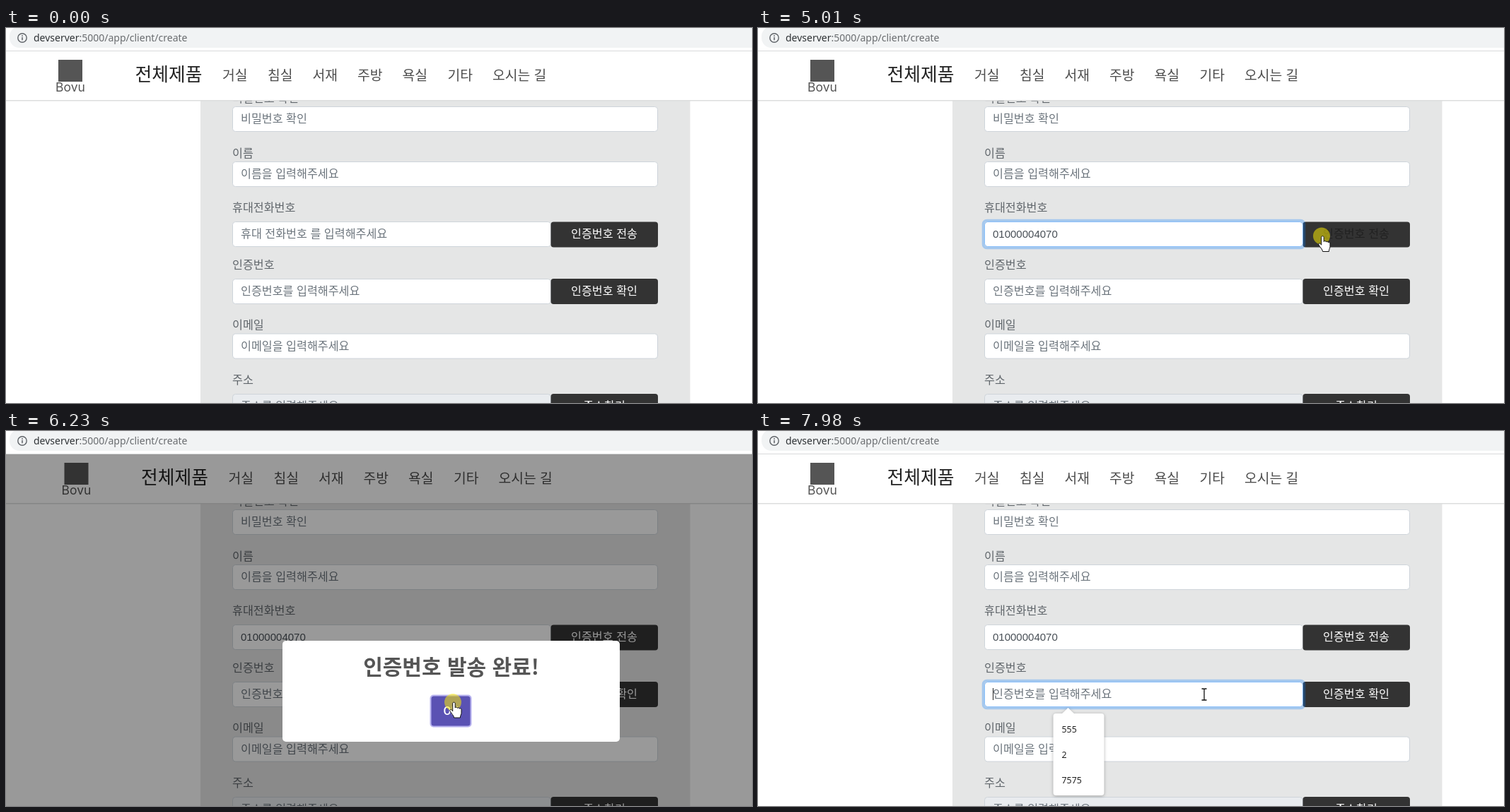
These frames come from a looping animation (1055x531 px, 8000 ms). An HTML page:

```html
<!DOCTYPE html>
<html lang="ko">
<head>
<meta charset="utf-8">
<title>회원가입</title>
<style>
html, body { margin: 0; width: 100%; height: 100%; overflow: hidden; background: #fff; }
svg { display: block; width: 100%; height: 100%; }
text { font: 16.2px "Noto Sans CJK KR", "Noto Sans CJK JP", sans-serif; white-space: pre; }
.label { fill: #60666b; }
.hint { fill: #6c757d; }
.button { fill: #fff; text-anchor: middle; }
.nav { font-size: 19.3px; fill: #4d4d4d; }
.brand { font-size: 25.8px; fill: #222; }
.logo { font: 17.5px Inter, sans-serif; fill: #555; text-anchor: middle; }
.url { font: 14px "Noto Sans", sans-serif; fill: #6a6d70; }
.typed { font: 15px "Liberation Sans", Arial, sans-serif; fill: #495057; }
.option { font: 12.4px "Noto Sans", sans-serif; fill: #222; }
.title { font-size: 30px; font-weight: 600; fill: #555; text-anchor: middle; }
.ok { font: 500 16px Roboto, sans-serif; fill: #fff; text-anchor: middle; }
.popup { filter: drop-shadow(0 1px 2px rgba(0, 0, 0, .3)); }
</style>
</head>
<body>
<svg id="stage" viewBox="0 0 1055 531"></svg>
<script>
const LOOP = 8000;
const PHONE = '01000004070';
const DIGIT = 8.34;

const text = (x, y, str, cls, id = '') => `<text x="${x}" y="${y}" class="${cls}" id="${id}">${str}</text>`;
const rect = (x, y, w, h, fill, extra = '') =>
  `<rect x="${x}" y="${y}" width="${w}" height="${h}" fill="${fill}" ${extra}/>`;

const field = (y, w, hint, id, fill = '#fff') =>
  rect(320.5, y + .5, w, 35, fill, 'rx="4" stroke="#ced4da"') + text(332, y + 23, hint, 'hint', id);
const button = (y, label, id) =>
  rect(770.5, y, 151.5, 36, '#333', 'rx="4"') + text(846, y + 22.5, label, 'button', id);
const ring = (id, x, y, w, h) => `<g id="${id}" fill="none">
  ${rect(x - 1.5, y - 1.5, w + 3, h + 3, 'none', 'rx="5" stroke="#007bff" stroke-opacity=".28" stroke-width="3.6"')}
  ${rect(x + .5, y + .5, w - 1, h - 1, 'none', 'rx="4" stroke="#80bdff" stroke-opacity=".85"')}</g>`;
const popup = (id, y, w, options) => `<g id="${id}" class="popup">
  <path d="M429 ${y + 1}l9.5-9 9.5 9z" fill="#fff"/>
  ${rect(417.5, y, w, options.length * 36 + 8, '#fff', 'rx="4"')}
  ${options.map((o, i) => text(429.5, y + 27 + i * 36, o, 'option')).join('')}</g>`;

const numbers = [PHONE, '01011112020', '01010103030'];
const menu = [[306, '거실'], [370, '침실'], [433.5, '서재'], [497, '주방'], [560.5, '욕실'], [624.5, '기타'], [688, '오시는 길']];

document.getElementById('stage').innerHTML = `
  ${rect(0, 0, 1055, 531, '#fff')}
  ${rect(275, 100, 692.5, 431, '#e5e6e6')}
  ${text(320, 105, '비밀번호 확인', 'label')}
  ${text(320, 183, '이름', 'label')}
  ${text(320, 260, '휴대전화번호', 'label')}
  ${text(320, 341, '인증번호', 'label')}
  ${text(320, 426, '이메일', 'label')}
  ${text(320, 504, '주소', 'label')}
  ${field(111, 601, '비밀번호 확인')}
  ${field(189, 601, '이름을 입력해주세요')}
  ${field(274, 450, '휴대 전화번호 를 입력해주세요', 'phoneHint')}
  ${field(355, 450, '인증번호를 입력해주세요')}
  ${field(432.5, 601, '이메일을 입력해주세요')}
  ${field(518, 450, '주소를 입력해주세요', '', '#e9ecef')}
  ${button(274.5, '인증번호 전송', 'sendLabel')}
  ${button(355, '인증번호 확인')}
  ${button(518, '주소찾기')}
  ${text(332, 297, '', 'typed', 'phone')}
  ${ring('phoneRing', 320, 274, 451, 36)}
  ${ring('codeRing', 320, 355, 451, 36)}
  ${ring('sendRing', 770, 274, 152, 36)}
  ${rect(0, 0, 1, 17, '#222', 'id="caret"')}
  ${popup('allNumbers', 319, 120, [...numbers, '1234', '777', '12'])}
  ${popup('someNumbers', 319, 120, numbers)}
  ${popup('oneNumber', 319, 120, [PHONE])}
  ${popup('codes', 400, 72, ['555', '2', '7575'])}
  ${rect(0, 102, 1055, 1.5, '#dcdddd')}
  ${rect(0, 33, 1055, 69, '#fff')}
  <g id="header">
    ${rect(74, 45, 34, 31, '#555')}
    ${text(91, 90, 'Bovu', 'logo')}
    ${text(182.5, 75, '전체제품', 'brand')}
    ${menu.map(([x, s]) => text(x, 74, s, 'nav')).join('')}
  </g>
  ${rect(0, 33, 1055, 498, '#000', 'id="shade"')}
  ${rect(0, 0, 1055, 33, '#fff')}
  ${rect(5, -2, 1080, 30, '#f1f3f4', 'rx="14"')}
  ${rect(0, 32, 1055, 1, '#d9dadb')}
  <circle cx="23" cy="14" r="6.2" fill="none" stroke="#5f6368" stroke-width="1.4"/>
  <path d="M23 13v4.2M23 10.3v1.6" stroke="#5f6368" stroke-width="1.5"/>
  ${text(39, 19, '<tspan fill="#2f3336">devserver</tspan>:5000/app/client/create', 'url')}
  <g id="modal">
    ${rect(-238.5, -71.5, 477, 143, '#fff', 'rx="5"')}
    ${text(0, -23.5, '인증번호 발송 완료!', 'title')}
    ${rect(-30, 5, 59, 46, '#b7b2ef', 'rx="5"')}
    ${rect(-28, 7, 55, 42, '#7066e0', 'rx="3.5" id="ok"')}
    ${text(-.5, 33.5, 'OK', 'ok')}
  </g>
  <g id="pointer">
    <circle id="click" r="12" fill="#fff000" fill-opacity=".52"/>
    <path id="arrow" d="M.5 .5v16l3.7-3.5 2.5 5.7 2.6-1.1-2.4-5.5h5z" fill="#fff" stroke="#111"/>
    <path id="hand" d="M-.3 2c0-2.5 3.5-2.5 3.5 0v6c.4-1.4 3.1-1.3 3.2.4.5-1.1 2.8-.8 2.9.8.7-.9 2.7-.5 2.7 1.2v4.800c0 2-1.600 3.500-1.600 6.800H1.600C1.300 18.500-2 16.500-4 12.500c-.8-1.900 1.300-2.900 2.600-1.300l1.100 1.500z" fill="#fff" stroke="#111"/>
    <g id="beam" fill="none">
      <path d="M-3.500-8h2.500q1 0 1 1 0-1 1-1h2.500M0-7V7M-3.500 8h2.500q1 0 1-1 0 1 1 1h2.500" stroke="#fff" stroke-width="3"/>
      <path d="M-3.500-8h2.500q1 0 1 1 0-1 1-1h2.500M0-7V7M-3.500 8h2.500q1 0 1-1 0 1 1 1h2.500" stroke="#111" stroke-width="1.300"/>
    </g>
  </g>`;

const ui = {};
document.querySelectorAll('[id]').forEach(el => { if (el.id) ui[el.id] = el; });

// Each track is a list of [time, value].
const typing = [[0, 0], [2100, 1], [2440, 2], [2510, 3], [2780, 4], [2980, 5], [3040, 6], [3170, 7],
  [3430, 8], [3640, 9], [3710, 10], [3780, 11]];
const blink = [[0, 0], [900, 1], [1300, 0], [1700, 1], [4110, 0], [4510, 1], [4910, 0], [7715, 1]];
const moveX = [[330, 992], [880, 638], [4430, 638], [4930, 797], [5270, 797], [6030, 632], [7100, 632], [7250, 631]];
const moveY = [[330, 525], [880, 287], [4430, 287], [4930, 294.5], [5270, 294.5], [6030, 384], [6630, 384],
  [6660, 382], [7100, 382], [7250, 373]];
const modalScale = [[5072, .7], [5210, 1.05], [5315, .95], [5375, 1], [6285, 1], [6435, .5]];

const smooth = p => p * p * (3 - 2 * p);
const easeOut = p => 1 - (1 - p) ** 2.3;
const linear = p => p;

function held(track, t) {
  return track.reduce((value, [at, next]) => t >= at ? next : value, track[0][1]);
}
function tween(track, t, ease = linear) {
  const i = track.findIndex(([at]) => at > t);
  if (i === 0) return track[0][1];
  if (i < 0) return track[track.length - 1][1];
  const [t0, a] = track[i - 1], [t1, b] = track[i];
  return a + (b - a) * ease((t - t0) / (t1 - t0));
}
const pulse = (t, in0, in1, out0, out1) => tween([[in0, 0], [in1, 1], [out0, 1], [out1, 0]], t);
const within = (t, a, b) => t >= a && t < b;
const show = (el, on) => { el.style.opacity = +on; };

function cursorKind(t, x, y) {
  if (within(t, 5075, 6640)) {
    return t < 6290 && Math.abs(x - 629) < 28 && within(y, 375, 418) ? 'hand' : 'arrow';
  }
  const rows = [[111, 147], [189, 225], [274, 310], [355, 391], [432, 468], [518, 554]];
  const row = rows.findIndex(([top, bottom]) => within(y, top, bottom));
  if (row < 0 || !within(x, 320, 922)) return 'arrow';
  return x > 770 && [2, 3, 5].includes(row) ? 'hand' : 'beam';
}

function render(t) {
  const count = held(typing, t);
  const onCode = t >= 7715;
  ui.phone.textContent = PHONE.slice(0, count);
  show(ui.phoneHint, count === 0);
  show(ui.caret, held(blink, t));
  ui.caret.setAttribute('x', onCode ? 332 : 332 + count * DIGIT);
  ui.caret.setAttribute('y', onCode ? 364 : 283);

  show(ui.phoneRing, pulse(t, 880, 1030, 5065, 5135));
  show(ui.sendRing, pulse(t, 6630, 6775, 7710, 7850));
  show(ui.codeRing, tween([[7710, 0], [7850, 1]], t));
  show(ui.allNumbers, t < 2160 ? tween([[960, 0], [1035, 1]], t) : 0);
  show(ui.someNumbers, within(t, 2160, 2780));
  show(ui.oneNumber, t < 2780 ? 0 : tween([[3780, 1], [3900, 0]], t));
  show(ui.codes, tween([[7830, 0], [7960, 1]], t));

  const tone = Math.round(tween([[4780, 255], [4930, 33], [5075, 33], [5220, 255]], t));
  ui.sendLabel.style.fill = `rgb(${tone},${tone},${tone})`;

  ui.header.setAttribute('transform', `translate(${within(t, 5075, 6430) ? 8.5 : 0} 0)`);
  show(ui.shade, .4 * pulse(t, 5072, 5135, 6290, 6400));
  show(ui.modal, pulse(t, 5072, 5110, 6285, 6430));
  ui.modal.setAttribute('transform', `translate(629.500 368.500) scale(${tween(modalScale, t, easeOut)})`);

  const x = tween(moveX, t, smooth), y = tween(moveY, t, smooth);
  const kind = cursorKind(t, x, y);
  ui.ok.style.fill = within(t, 6155, 6290) ? '#5a52b3' : kind === 'hand' && t > 5900 ? '#655cca' : '#7066e0';
  ui.pointer.setAttribute('transform', `translate(${x} ${y})`);
  show(ui.pointer, t >= 330);
  for (const name of ['arrow', 'hand', 'beam']) show(ui[name], name === kind);
  show(ui.click, within(t, 870, 1000) || within(t, 4940, 5075) || within(t, 6155, 6290) || within(t, 7705, 7840));
}

const start = performance.now();
function frame() {
  render((performance.now() - start) % LOOP);
  requestAnimationFrame(frame);
}
frame();
</script>
</body>
</html>
```
